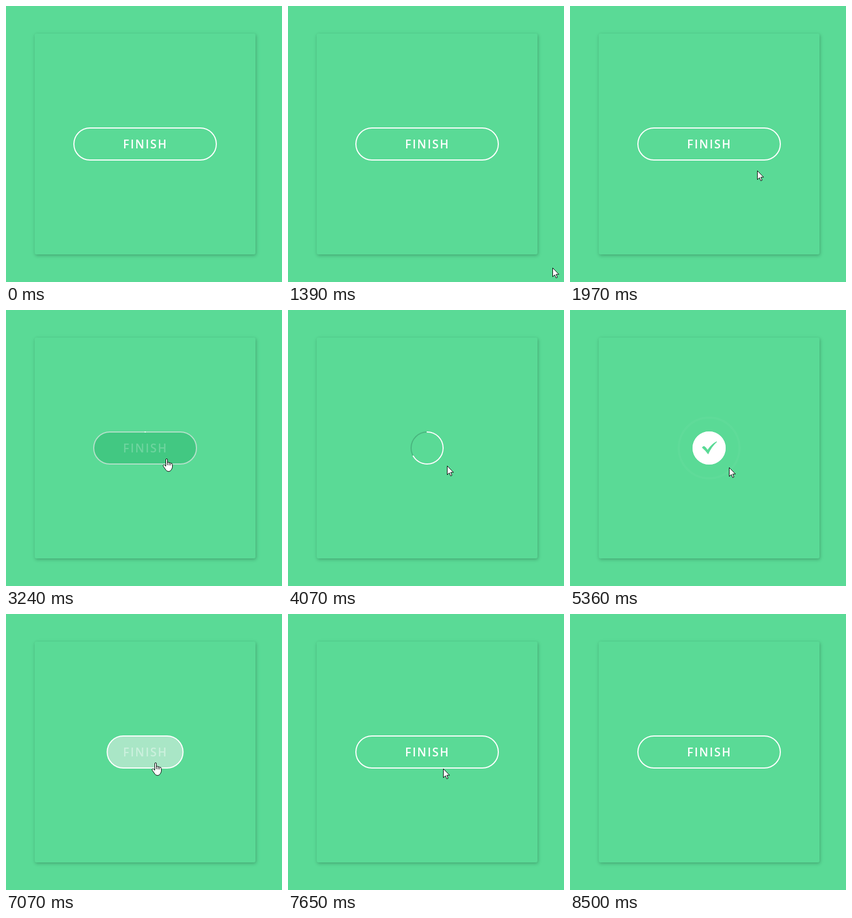
An HTML page with a canvas for the animation above (8.82 s loop, 500 by 500 pixels).

```html
<!DOCTYPE html>
<html lang="en">
<head>
<meta charset="utf-8">
<title>Finish button</title>
<style>
  html, body { margin: 0; width: 100%; height: 100%; overflow: hidden; background: #5ada96; }
  .card {
    position: absolute; left: 52px; top: 50px; width: 400px; height: 400px; border-radius: 3px;
    box-shadow: 1px 2px 5px rgba(0,0,0,.16), 1px 2px 10px rgba(0,0,0,.09);
  }
  canvas { position: absolute; left: 0; top: 0; width: 500px; height: 500px; }
</style>
</head>
<body>
<div class="card"></div>
<canvas></canvas>
<script>
const LOOP = 8820, CX = 252, CY = 250, R = 29;
const GREEN = [90, 218, 150], DARK = [66, 200, 130], TRACK = [74, 181, 127], WHITE = [255, 255, 255];

const canvas = document.querySelector('canvas');
const ctx = canvas.getContext('2d');
const scale = window.devicePixelRatio || 1;
canvas.width = canvas.height = 500 * scale;

const clamp = v => Math.max(0, Math.min(1, v));
const span = (t, from, to) => clamp((t - from) / (to - from));
const mix = (a, b, p) => a + (b - a) * p;
const blend = (a, b, p) => a.map((v, i) => mix(v, b[i], p));
const rgba = (c, alpha = 1) => `rgba(${c.map(Math.round)},${alpha})`;

function bezier(x1, y1, x2, y2) {
  const curve = (a, b, s) => 3 * (1 - s) * (1 - s) * s * a + 3 * (1 - s) * s * s * b + s * s * s;
  return x => {
    let lo = 0, hi = 1;
    for (let i = 0; i < 22; i++) {
      const mid = (lo + hi) / 2;
      if (curve(x1, x2, mid) < x) lo = mid; else hi = mid;
    }
    return x <= 0 ? 0 : x >= 1 ? 1 : curve(y1, y2, lo);
  };
}
const easeInOut = bezier(.42, 0, .58, 1);
const easeOut = bezier(0, 0, .58, 1);
const lateEase = bezier(.72, 0, .74, 1);

const arrow = new Path2D('M.5.5V16.5L4.2 13L6.6 18.6L9 17.6L6.7 12.1H11.7Z');
const hand = new Path2D('M5.5 14V2Q5.5.5 7 .5T8.5 2V8.2Q8.8 6.6 10.2 6.8T11.5 8.6' +
  'Q11.8 7.3 13 7.5T14.4 9.3Q14.8 8.2 16 8.7T17.5 10.6V15Q17.3 18 15.5 20.2' +
  'Q14 23.5 11 23.5Q7.2 23.5 5.8 21L1 14.2Q0 12.5 1.3 11.7T3.6 12.3Z');
const knuckles = new Path2D('M8.5 8V12M11.5 8.5V12.5M14.4 9.2V12.5');
const check = new Path2D('M239 249.2Q241 246.4 243 246.6Q247 249 249.2 253.2' +
  'Q256 243 265.5 238L266.2 239Q257 247 250.3 261.5Q246 255 239 249.2Z');

function circle(r, start = 0, part = 1) {
  const top = -Math.PI / 2;
  ctx.beginPath();
  ctx.arc(CX, CY, r, top + start, top + start + part * 2 * Math.PI);
}

function drawPill(width, fill, stroke) {
  ctx.beginPath();
  ctx.roundRect(CX - width / 2 + 1, CY - R, width - 2, 2 * R, R);
  ctx.fillStyle = fill;
  ctx.fill();
  ctx.strokeStyle = stroke;
  ctx.lineWidth = 2;
  ctx.stroke();
}

function drawLabel(alpha) {
  if (alpha <= 0) return;
  ctx.font = '600 21px "Open Sans", sans-serif';
  ctx.letterSpacing = '2.2px';
  ctx.fillStyle = rgba(WHITE, alpha);
  ctx.fillText('FINISH', 212.1, 258);
}

function drawShrink(t) {
  const p = easeInOut(span(t, 2870, 3760));
  const shade = span(t, 2870, 3080) * (1 - span(t, 3420, 3760));
  drawPill(mix(260, 60, p), rgba(DARK, shade), rgba(blend(WHITE, TRACK, Math.min(1, p * 1.15))));
  drawLabel(1 - span(t, 2870, 3350));
  if (t >= 3220) {
    circle(R, 0, Math.max(.002, easeInOut(span(t, 3220, 4640))));
    ctx.strokeStyle = '#fff';
    ctx.lineCap = 'round';
    ctx.stroke();
    ctx.lineCap = 'butt';
  }
}

function drawDone(t) {
  const grow = easeOut(span(t, 4640, 5360));
  circle(mix(30, 55, grow));
  ctx.strokeStyle = rgba(WHITE, mix(.4, .035, grow));
  ctx.lineWidth = 4;
  ctx.stroke();

  circle(30);
  ctx.fillStyle = rgba(blend(GREEN, WHITE, span(t, 4600, 4760)));
  ctx.fill();
  circle(R);
  ctx.strokeStyle = '#fff';
  ctx.lineWidth = 2;
  ctx.stroke();

  const size = easeOut(span(t, 4680, 4960));
  ctx.save();
  ctx.translate(CX, CY);
  ctx.scale(size, size);
  ctx.translate(-CX, -CY);
  ctx.fillStyle = rgba(GREEN);
  ctx.fill(check);
  ctx.restore();
}

function drawReset(t) {
  const p = lateEase(span(t, 6800, 7240));
  const toDark = span(t, 6800, 7070) * .45;
  const alpha = 1 - span(t, 7070, 7240);
  drawPill(mix(60, 260, p), rgba(blend(WHITE, DARK, toDark), alpha), '#fff');
  ctx.fillStyle = rgba(GREEN, 1 - span(t, 6800, 6930));
  ctx.fill(check);
  drawLabel(span(t, 6900, 7240) * .8 + span(t, 7150, 7240) * .2);
}

// Pointer stops: time, x, y
const stops = [
  [1200, 497, 497], [2010, 338, 297], [2110, 338, 297], [2420, 276, 256],
  [2700, 291, 269], [3770, 291, 269], [4040, 288, 282], [4200, 288, 282],
  [4400, 288, 285], [6120, 288, 285], [6650, 271, 269], [7510, 271, 269],
  [8390, 460, 477], [8500, 470, 491]
];

function drawPointer(t) {
  if (t < 1220 || t >= 8500) return;
  const i = stops.findIndex(s => s[0] > t);
  const [from, x0, y0] = stops[i - 1], [to, x1, y1] = stops[i];
  const p = easeInOut(span(t, from, to));
  const x = Math.round(mix(x0, x1, p)), y = Math.round(mix(y0, y1, p));
  const small = t >= 3780 && t < 6800;
  const inside = small
    ? Math.hypot(x - CX, y - CY) < 30
    : Math.abs(x - CX) < 130 && Math.abs(y - CY) < 30;

  ctx.save();
  ctx.translate(inside ? x - 7 : x, y);
  ctx.fillStyle = '#fff';
  ctx.strokeStyle = '#000';
  ctx.lineWidth = 1;
  ctx.lineJoin = 'round';
  ctx.fill(inside ? hand : arrow);
  ctx.stroke(inside ? hand : arrow);
  if (inside) ctx.stroke(knuckles);
  ctx.restore();
}

function draw(t) {
  ctx.setTransform(scale, 0, 0, scale, 0, 0);
  ctx.clearRect(0, 0, 500, 500);
  if (t < 2880 || t >= 7240) {
    drawPill(260, 'transparent', '#fff');
    drawLabel(1);
  } else if (t < 4640) {
    drawShrink(t);
  } else if (t < 6800) {
    drawDone(t);
  } else {
    drawReset(t);
  }
  drawPointer(t);
}

const begin = performance.now();
function tick() {
  draw((performance.now() - begin) % LOOP);
  requestAnimationFrame(tick);
}
tick();
</script>
</body>
</html>
```
